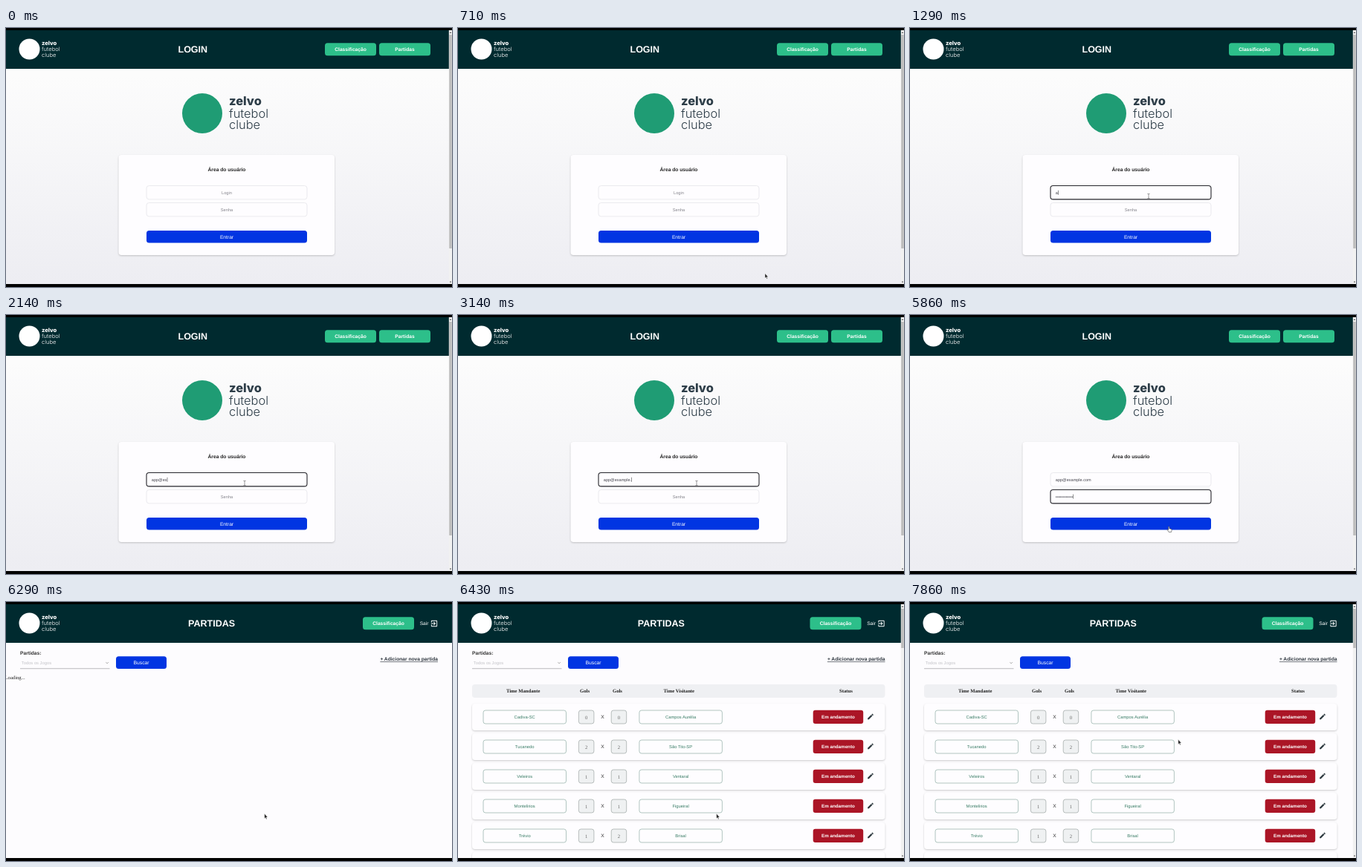
Animation, 600 px wide and 349 px high, one loop 8000 ms. Source, as an HTML page:

```html
<!DOCTYPE html>
<html lang="pt">
<head>
<meta charset="utf-8">
<title>Partidas</title>
<style>
html, body { margin: 0; height: 100%; overflow: hidden; background: #000; }
svg { display: block; width: 100vw; height: 100vh; }
text { font-family: "Liberation Sans", Arial, sans-serif; text-rendering: geometricPrecision; }
.serif { font-family: "Liberation Serif", Times, serif; }
.brand { font-family: Inter, sans-serif; }
.b { font-weight: bold; }
.card { fill: #fefdff; filter: drop-shadow(0 1px 1px #0003); }
</style>
</head>
<body>
<svg id="stage" viewBox="0 0 600 349"></svg>
<script>
const stage = document.getElementById('stage');
const GREEN = '#2dbf8a', BLUE = '#0135e2', DARK = '#002a2f', PAPER = '#fdfcfe';

const rect = (x, y, w, h, fill, r = 0, extra = '') =>
  `<rect x="${x}" y="${y}" width="${w}" height="${h}" rx="${r}" fill="${fill}" ${extra}/>`;

// y is the vertical middle of the capitals
const text = (s, x, y, size, fill, cls = '', anchor = 'middle', extra = '') =>
  `<text x="${x}" y="${y + size * .36}" font-size="${size}" fill="${fill}" class="${cls}" text-anchor="${anchor}" ${extra}>${s}</text>`;

const button = (s, x, y, w, h, fill, size = 6.67, cls = 'b', r = 3.5) =>
  rect(x, y, w, h, fill, r) + text(s, x + w / 2, y + h / 2, size, '#fff', cls);

const icon = (d, x, y, scale, fill) =>
  `<path transform="translate(${x} ${y}) scale(${scale}) translate(-12 -12)" d="${d}" fill="${fill}"/>`;

const EXIT = 'M10.1 15.6L11.5 17l5-5-5-5-1.4 1.4L12.7 11H3v2h9.7zM19 3H5a2 2 0 0 0-2 2v4h2V5h14v14H5v-4H3v4a2 2 0 0 0 2 2h14a2 2 0 0 0 2-2V5a2 2 0 0 0-2-2z';
const PENCIL = 'M3 17.2V21h3.8L17.8 9.9l-3.7-3.7zM20.7 7a1 1 0 0 0 0-1.4l-2.3-2.3a1 1 0 0 0-1.4 0l-1.9 1.8 3.8 3.8z';

const brand = (cx, cy, r, mark, ink, x, size, baselines) =>
  `<circle cx="${cx}" cy="${cy}" r="${r}" fill="${mark}"/>` +
  ['zelvo', 'futebol', 'clube'].map((s, i) =>
    `<text class="brand" x="${x}" y="${baselines[i]}" font-size="${size}" font-weight="${i ? 300 : 800}" fill="${ink}">${s}</text>`).join('');

const header = (title, x, width) =>
  rect(0, 3, width, 52, DARK) +
  brand(31.5, 28.5, 14, '#fff', '#fff', 48, 7.6, [23, 31, 38.5]) +
  text(title, x, 28.8, 12.5, '#fff', 'b');

const scrollbar = (top, bottom) =>
  rect(595.8, 3, 4.2, 342, '#f1f1f1') + rect(596.2, top, 3.6, bottom - top, '#bdbdbd') +
  '<path d="M596.8 7l1.2-2 1.2 2zM596.8 341.5l1.2 2 1.2-2z" fill="#555"/>';

const field = (id, y, hint) =>
  rect(189, y, 216, 18.4, '#fefdff', 3.5, `id="${id}Box"`) +
  text(hint, 297, y + 9.3, 5.7, '#85858c', '', 'middle', `id="${id}Hint"`) +
  text('', 195.8, y + 9.3, 5.55, '#44444c', '', 'start', `id="${id}"`);

const login = rect(0, 3, 596, 342, 'url(#fade)') + header('LOGIN', 251.3, 596) +
  button('Classificação', 429, 20.3, 69, 17, GREEN) +
  button('Partidas', 502, 20.3, 69, 17, GREEN) +
  brand(264, 115, 27, '#1f9c74', '#2d3d48', 300, 16.4, [103.5, 121, 136]) +
  rect(151.5, 171, 290.5, 135, '', 4, 'class="card"') +
  text('Área do usuário', 297, 190.5, 6.7, '#222', 'b') +
  field('email', 212.5, 'Login') + field('pass', 235.5, 'Senha') +
  rect(0, 0, .5, 6, '#222', 0, 'id="caret"') +
  button('Entrar', 189, 273, 216, 16.4, BLUE, 6.67, '') +
  scrollbar(9, 297);

// shift: space taken from the right edge by the scrollbar
const gamesTop = shift =>
  rect(0, 3, 600, 342, PAPER) + header('PARTIDAS', 276.6 - shift / 2, 600) +
  button('Classificação', 480 - shift, 20.3, 69, 17, GREEN) +
  text('Sair', 556.7 - shift, 28.8, 6.6, '#fff', '', 'start') +
  icon(EXIT, 576 - shift, 29, .46, '#fff') +
  text('Partidas:', 19, 68.2, 6.67, '#333', 'b', 'start') +
  text('Todos os Jogos', 20.8, 82, 5.8, '#c3c3c8', '', 'start') +
  '<path d="M134.3 81.2l1.8 1.6 1.8-1.6" fill="none" stroke="#888" stroke-width=".7"/>' +
  rect(19, 89.4, 120.5, .8, '#a9a9ae') +
  button('Buscar', 148, 73.3, 68, 16.7, BLUE, 6.8, '') +
  text('+ Adicionar nova partida', 581 - shift, 77, 6.67, '#303840', 'b', 'end', 'text-decoration="underline"');

const loading = gamesTop(0) + text('Loading...', -1.5, 102, 6.67, '#222', 'serif', 'start');

const matches = [
  ['Cadiva-SC', 0, 0, 'Campos Aurélia'],
  ['Tucanedo', 2, 2, 'São Tito-SP'],
  ['Veleiros', 1, 1, 'Ventaral'],
  ['Montelirios', 1, 1, 'Figueiral'],
  ['Trévio', 1, 2, 'Brisal']
];

const team = (s, x, y) =>
  rect(x, y - 9, 111.5, 18, '#fefdff', 3, 'stroke="#7d9f96" stroke-width=".6"') +
  text(s, x + 55.7, y, 5.83, '#3a7d66');

const goals = (n, x, y) =>
  rect(x, y - 9, 20.5, 18, '#eff1f2', 3, 'stroke="#8d9896" stroke-width=".6"') +
  text(n, x + 10.2, y + .3, 6.67, '#666', 'serif');

const rowCard = y => rect(19, y - 18, 555.5, 36, '', 4, 'class="card"');

const row = ([home, a, b, away], i) => {
  const y = 155 + 40 * i;
  return rowCard(y) + team(home, 34, y) + goals(a, 162.4, y) +
    text('X', 194.5, y, 6.67, '#333') + goals(b, 206.2, y) + team(away, 243.9, y) +
    button('Em andamento', 477.7, y - 9.3, 67.5, 18.2, '#ab1526', 6.25, 'b', 3) +
    icon(PENCIL, 555, y - .5, .43, '#2a363c');
};

const columns = [['Time Mandante', 87.7], ['Gols', 170.6], ['Gols', 214.5], ['Time Visitante', 297.3], ['Status', 522]];

const games = gamesTop(6.5) + rect(19, 111, 555.5, 18, '#eff0f3', 4) +
  columns.map(([s, x]) => text(s, x, 119.8, 6.67, '#222', 'serif b')).join('') +
  matches.map(row).join('') + rowCard(355) + scrollbar(9, 62);

const pointers =
  '<path id="beam" d="M-1.6-3.2Q0-3.2 0-2.4Q0-3.2 1.6-3.2M0-2.6V2.6M-1.6 3.2Q0 3.2 0 2.4Q0 3.2 1.6 3.2" fill="none" stroke="#555" stroke-width=".6"/>' +
  '<path id="arrow" d="M0 0V6.4L1.4 5.1 2.4 7.4 3.4 7 2.4 4.8H4.3Z" fill="#222" stroke="#fff" stroke-width=".4"/>' +
  '<path id="hand" d="M0 0Q.6-.5 1.2 0V2.5L4.2 3.2Q4.7 5 3.8 7.2H.4L-1.6 4Q-1.2 3.3 0 4.2Z" fill="#fff" stroke="#222" stroke-width=".5"/>';

stage.innerHTML =
  `<defs><linearGradient id="fade" x2="0" y2="1"><stop offset=".18" stop-color="#fcfcfc"/><stop offset="1" stop-color="#ededf2"/></linearGradient></defs>
  <g id="login">${login}</g><g id="loading">${loading}</g><g id="games">${games}</g>
  <g id="mouse">${pointers}</g>` +
  rect(0, 0, 600, 3, '#000') + rect(0, 345, 600, 4, '#000');

const el = id => document.getElementById(id);
const show = (id, on) => el(id).style.display = on ? '' : 'none';
const clamp = (v, max) => Math.max(0, Math.min(max, v));

const EMAIL = 'app@example.com', TICK = 1000 / 7;
// [start tick, end tick, from, to]
const moves = [
  [3, 7, [430, 350], [321, 226.5]],
  [37, 41, [321, 226.5], [347.7, 285.3]],
  [49, 54, [347.7, 285.3], [360.8, 185.3]]
];

function mouseAt(n) {
  const [a, b, from, to] = moves.filter(m => n >= m[0]).pop() || moves[0];
  const p = clamp((n - a) / (b - a), 1), e = p * p * (3 - 2 * p);
  return from.map((v, i) => v + (to[i] - v) * e);
}

function fill(id, value, focused) {
  el(id).textContent = value;
  show(id + 'Hint', !value);
  const box = el(id + 'Box');
  box.setAttribute('stroke', focused ? '#25252b' : '#dedee3');
  box.setAttribute('stroke-width', focused ? 1.1 : .6);
}

function draw(ms) {
  const n = Math.floor((ms % 8000 + 3) / TICK);
  const page = n < 43 ? 'login' : n < 45 ? 'loading' : 'games';
  ['login', 'loading', 'games'].forEach(id => show(id, id === page));

  const focus = n < 7 ? '' : n < 26 ? 'email' : 'pass';
  const typed = n < 9 ? 0 : clamp(Math.round(1 + (n - 9) * 11 / 13), 15);
  fill('email', EMAIL.slice(0, typed), focus === 'email');
  fill('pass', '•'.repeat(clamp(Math.round((n - 26) * 1.5), 12)), focus === 'pass');
  show('caret', focus);
  if (focus && page === 'login') {
    const x = 196 + el(focus).getComputedTextLength();
    el('caret').setAttribute('transform', `translate(${x} ${focus === 'email' ? 218.8 : 241.6})`);
  }

  const [x, y] = mouseAt(n);
  const inside = (top, bottom) => page === 'login' && x > 189 && x < 405 && y > top && y < bottom;
  const shape = inside(212, 254) ? 'beam' : inside(273, 290) ? 'hand' : 'arrow';
  ['beam', 'hand', 'arrow'].forEach(id => show(id, id === shape));
  el('mouse').setAttribute('transform', `translate(${x} ${y})`);
}

const start = performance.now();
function loop() {
  draw(performance.now() - start);
  requestAnimationFrame(loop);
}
loop();
</script>
</body>
</html>
```
